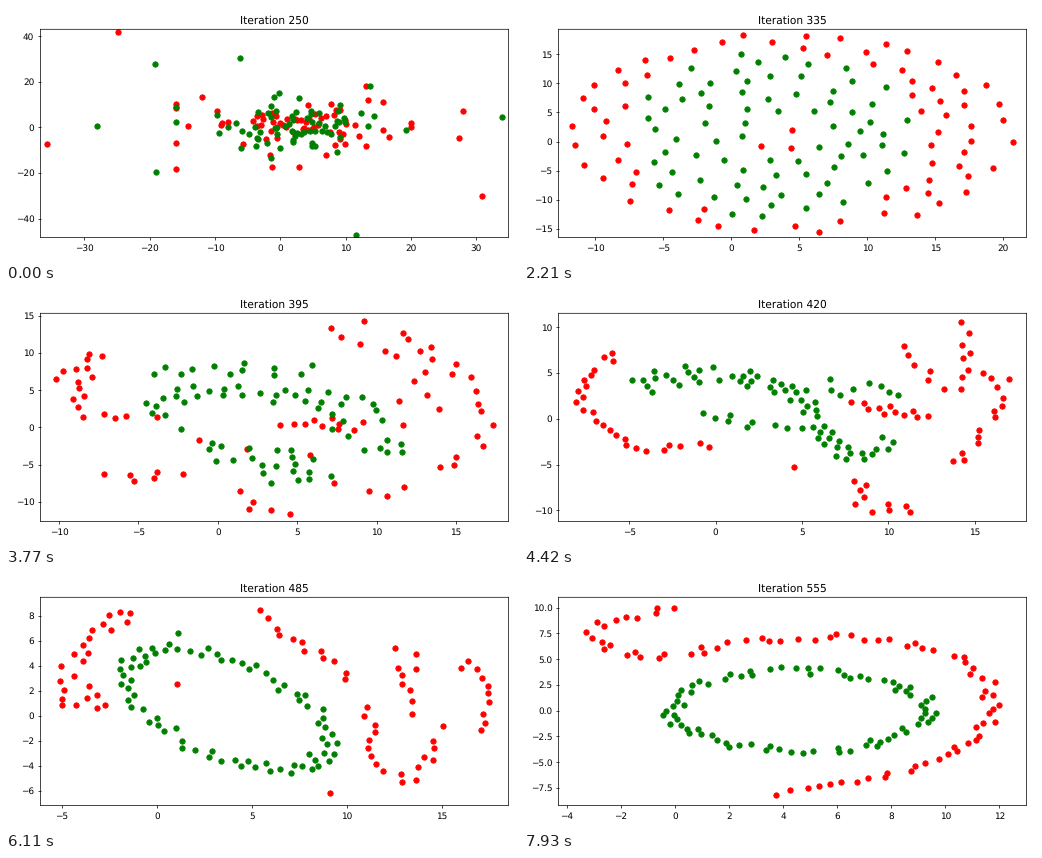
A matplotlib script for the animation above (8 s loop, 512 px wide and 256 px high).

```python
from itertools import combinations

import matplotlib.pyplot as plt
import numpy as np
from matplotlib.animation import FuncAnimation

LOOP, FRAMES = 8000, 62
FIRST, STEP = 250, 5  # iteration counter
COUNT = 75            # dots per colour
rng = np.random.default_rng(8)
plt.rcParams.update({"path.snap": False, "text.hinting": "none"})


def points(*xy):
    return np.array(xy, float).reshape(-1, 2)


def trail(n, width, *xy):
    """n evenly spaced dots, shaken by width, along a smooth curve through xy."""
    p = points(*xy)
    p = np.vstack([2 * p[0] - p[1], p, 2 * p[-1] - p[-2]])
    u = np.linspace(0, 1, 30)[:, None]
    line = np.vstack([
        b + u / 2 * (c - a + u * (2 * a - 5 * b + 4 * c - d
                                  + u * (3 * (b - c) + d - a)))
        for a, b, c, d in zip(p, p[1:], p[2:], p[3:])])
    run = np.r_[0, np.cumsum(np.hypot(*np.diff(line, axis=0).T))]
    at = np.linspace(0, run[-1], n)
    dots = np.column_stack([np.interp(at, run, axis) for axis in line.T])
    return dots + rng.uniform(-width, width, dots.shape)


def ring(cx, cy, rx, ry, lean, width):
    t = np.linspace(0, 2 * np.pi, COUNT, endpoint=False)
    dots = np.column_stack([cx + rx * np.cos(t), cy + ry * np.sin(t + lean)])
    return dots + rng.uniform(-width, width, dots.shape)


def burst(*far):
    """Dense core with heavy tails, plus the farthest dots."""
    far = points(*far)
    core = (3, 0.5) + rng.standard_t(4, (COUNT - len(far), 2)) * (5.5, 5)
    return np.vstack([far, np.clip(core, (-16, -20), (20, 18))])


def blob(cx, cy, rx, ry):
    """Even scatter in an ellipse; the dots nearest a middle ring are green."""
    dots = []
    while len(dots) < 2 * COUNT:
        c = rng.uniform(-1, 1, (60, 2)) 
        c = c[np.hypot(*c.T) < 1] * (rx, ry) + (cx, cy)
        gaps = [min((np.hypot(*(p - q)) for q in dots), default=1) for p in c]
        dots.append(c[np.argmax(gaps)])
    dots = np.array(dots)
    r = np.hypot(*((dots - (3.5, 1)) / (10.5, 14.5)).T)
    dots = dots[np.argsort(abs(r - 0.6))]
    return dots[COUNT:], dots[:COUNT]


def settle(x0, x1, y0, y1, gap, red, green):
    """Push crowded dots apart and fit both colours into the given box."""
    dots = np.vstack([red, green])
    for _ in range(20):
        d = dots[:, None] - dots
        dist = np.hypot(d[..., 0], d[..., 1]) + np.eye(len(dots))
        push = np.clip(gap - dist, 0, None) / dist
        np.fill_diagonal(push, 0)
        dots = dots + 0.3 * (d * push[..., None]).sum(1)
    low, high = dots.min(0), dots.max(0)
    dots = (x0, y0) + (dots - low) / (high - low) * (x1 - x0, y1 - y0)
    return [dots[:COUNT], dots[COUNT:]]


def match(a, b):
    """Reorder b so that the dots of a travel little."""
    b = b.copy()
    for _ in range(8):
        for i, j in combinations(range(len(a)), 2):
            if (a[i] - a[j]) @ (b[i] - b[j]) < 0:
                b[[i, j]] = b[[j, i]]
    return b


poses = [
    settle(-35.7, 33.9, -47.3, 42, 0.4,
           burst(-35.7, -7.3, -24.9, 42, -16, -18.3, -16, 8.8, 30.8, -30,
                 27.9, 7.3, 27.4, -4.7),
           burst(33.9, 4.6, 11.6, -47.3, -28.1, 0.6, -19.2, 27.8,
                 -19.1, -19.7, -6.1, 30.5)),
    settle(-11.7, 20.7, -15.5, 18.3, 1.5, *blob(4.5, 1.4, 16.2, 17)),
    settle(-11.9, 18.2, -13, 17.6, 1.1,
           np.vstack([
               trail(18, 0.9, -11.9, 7.9, -8, 10.5, -9, 3, -5, 3.5),
               trail(11, 1, -7.3, -10.3, -4, -10.5, -0.3, -13),
               trail(13, 1, 0.4, -1, 7, -1),
               trail(19, 1.6, 4, 15, 9, 14, 14, 9.5, 10.5, 2),
               trail(14, 0.8, 16, 6.6, 18, -2, 13, -7.8, 7.5, -9)]),
           np.vstack([
               trail(42, 1, -3, -1.5, -2, 3.5, 3, 4.5, 8.3, 4, 10, -2, 13.4, -3),
               trail(12, 1.2, -4, 8.3, 3, 9, 6, 9.5),
               trail(21, 1.2, 0, -4.5, 0.5, -9.5, 5.5, -8, 3, -5.5)])),
    settle(-8.1, 17, -10.2, 10.5, 0.65,
           np.vstack([
               trail(25, 0.4, -0.7, -2.3, -4, -2.8, -7, 0, -7.9, 3, -6, 7.6),
               trail(14, 0.3, 11, 8.2, 12.4, 4.9, 13.5, 3.6, 14.6, 5, 14.4, 10.5),
               trail(11, 0.3, 8.1, 2, 12.1, 0.5),
               trail(14, 0.4, 15.5, 5.5, 16.7, 4.5, 16.2, 1, 13.9, -4.4),
               trail(10, 0.6, 8, -6.6, 8.6, -8.8, 11.3, -9),
               points(4.5, -4.7)]),
           np.vstack([
               trail(59, 0.8, -4.7, 4.2, -2, 5, 1, 5, 4.5, 3.2, 6.3, -1.5,
                     8, -3.5, 9.7, -2),
               trail(8, 0.4, 6.3, 4.5, 7.5, 3, 9, 4, 10.8, 3),
               trail(8, 0.4, -0.8, 1.3, 1.5, -0.2, 3.8, -0.3)])),
    settle(-6.7, 19.3, -7.6, 8.2, 0.6,
           np.vstack([
               trail(25, 0.45, -1.7, -2.1, -4.9, -1.2, -6.2, 2, -4.9, 7),
               trail(49, 0.4, 6.6, 7.2, 10.3, 2.5, 12, -4.3, 14.2, -4.8,
                     15.1, 3, 17.5, 5.2, 19, 3.5, 18.1, 0.1),
               points(7.3, -7.6)]),
           np.vstack([ring(3.5, 1.1, 5.9, 5.2, -0.7, 0.45)[1:],
                      points(0.25, 8.2)])),
    settle(-4.55, 15.65, -4.85, 10.5, 0.5,
           trail(COUNT, 0.35, -3.2, 5, -4.3, 3.4, -3, 6.2, 0.7, 9.8, 3.6, 9.3,
                 5.4, 7.1, 8.7, 6, 10.9, 2, 10.9, -3, 12.5, -4.7, 15.3, -2,
                 14.4, 3),
           ring(4, -0.1, 4.7, 4.3, -0.4, 0.35)),
    settle(-3.3, 12, -8.2, 10, 0.42,
           trail(COUNT, 0.3, 0.1, 10, -3.1, 7.8, -1, 5.1, 3, 6.6, 7, 7,
                 10.4, 4.8, 11.8, 0, 9.8, -4.8, 7, -6.7, 4, -8.2),
           ring(4.7, -0.1, 4.7, 3.9, 0, 0.35)),
]

# the last two poses keep their order along the path
for k in range(4, -1, -1):
    poses[k] = [match(a, b) for a, b in zip(poses[k + 1], poses[k])]

steps = np.array([0, 17, 25, 34, 42, 53, 61])


def pose(i):
    k = min(np.searchsorted(steps, i, side="right") - 1, len(steps) - 2)
    u = (i - steps[k]) / (steps[k + 1] - steps[k])
    if k == 0:
        u = 1 - (1 - u) ** 2
    return [a * (1 - u) + b * u for a, b in zip(poses[k], poses[k + 1])]


fig, ax = plt.subplots(figsize=(8, 4), dpi=64)
lines = [ax.plot([], [], "o", color=c)[0] for c in ("red", "green")]


def draw(i):
    shown = pose(i)
    for line, dots in zip(lines, shown):
        line.set_data(*dots.T)
    both = np.vstack(shown)
    (x0, y0), (x1, y1) = both.min(0) - 1, both.max(0) + 1
    ax.set_xlim(x0, x1)
    ax.set_ylim(y0, y1)
    ax.set_title(f"Iteration {FIRST + STEP * i}")
    return lines


draw(0)
fig.tight_layout()
anim = FuncAnimation(fig, draw, frames=FRAMES, interval=LOOP / FRAMES,
                     repeat=True, repeat_delay=0, blit=False)
plt.show()
```
